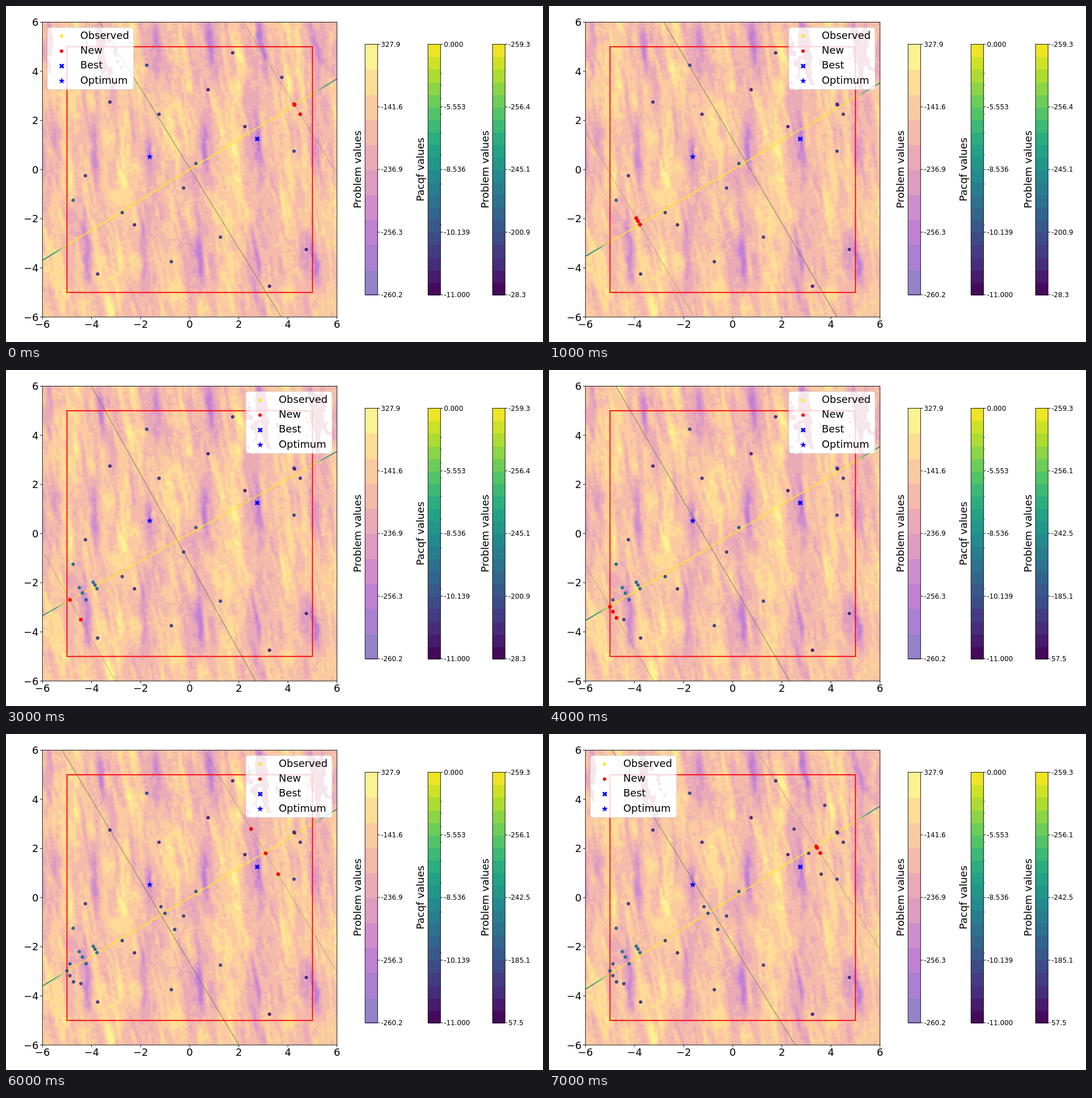
An HTML page with a canvas that plays this animation: 947 by 592 pixels, repeating every 8000 ms.

```html
<!DOCTYPE html>
<html lang="en">
<head>
<meta charset="utf-8">
<title>Optimisation steps</title>
<style>
html, body { margin: 0; width: 100%; height: 100%; overflow: hidden; background: #fff; }
canvas { display: block; }
</style>
</head>
<body>
<canvas id="stage" width="947" height="592"></canvas>
<script>
const ctx = document.getElementById('stage').getContext('2d');
const FONT = '"DejaVu Sans", sans-serif';
const LEFT = 64, TOP = 28, SIZE = 520, UNIT = 43.29;
const px = x => 324 + x * UNIT;
const py = y => 288.2 - y * UNIT;
const mix = (a, b, t) => a + (b - a) * t;
const clamp = (v, lo, hi) => Math.max(lo, Math.min(hi, v));
const bell = d => Math.exp(-d * d);

const palette = hex => hex.split(' ').map(h => [0, 2, 4].map(i => parseInt(h.substr(i, 2), 16)));
const WARM = palette('2c0594 5502a4 7e03a8 a01a9c bf3984 d6556d ea7457 f89540 feba2c f7e425')
  .map(c => c.map(v => (v + 255) / 2));
const VIRIDIS = palette('440154 482475 414487 355f8d 2a788e 21918c 22a884 44bf70 7ad151 bddf26 fde725');
const css = c => `rgb(${c.map(Math.round)})`;
const blend = (a, b, t) => a.map((v, i) => mix(v, b[i], t));
function viridis(t) {
  const i = Math.min(9, Math.floor(t * 10));
  return css(blend(VIRIDIS[i], VIRIDIS[i + 1], t * 10 - i));
}

function hash(x, y) {
  const s = Math.sin(x * 127.1 + y * 311.7) * 43758.5453;
  return (s - Math.floor(s)) * 2 - 1;
}
function noise(x, y) {
  const ix = Math.floor(x), iy = Math.floor(y);
  const ease = t => t * t * (3 - 2 * t);
  const fx = ease(x - ix), fy = ease(y - iy);
  return mix(mix(hash(ix, iy), hash(ix + 1, iy), fx), mix(hash(ix, iy + 1), hash(ix + 1, iy + 1), fx), fy);
}

// Valleys sit on a slightly skewed lattice; ridges run halfway between its columns.
function height(x, y) {
  const row = Math.round((y - 68) / 187), dy = y - 68 - row * 187;
  const spacing = 94 + 0.016 * (y - 70);
  const bend = 5 * Math.sin(dy / 187 * 2 * Math.PI) + 4 * noise(x / 45, y / 30);
  const track = (x + 2.5 * noise(x / 9, y / 12) - 75 + 0.09 * (y - 70) - bend) / spacing;
  const column = Math.round(track), d = (track - column) * spacing;
  const depth = (0.85 + 0.15 * hash(column, row)) * bell(dy / 58);
  const valley = depth * (2.9 * bell(d / 6) + 1.4 * bell(d / 17));
  const ridge = bell((spacing / 2 - Math.abs(d)) / 13);

  const u = x - 0.17 * y + 4 * noise(x / 30, y / 45);
  const grain = 1.3 * noise(u / 11, y / 75) + 0.95 * noise(u / 6 + 50, y / 28)
    + 0.6 * noise((x + y / 2) / 6 + 90, (y - x / 2) / 6);
  return 6.95 + grain - valley + ridge;
}
const HEIGHTS = Array.from({ length: SIZE * SIZE }, (_, i) =>
  height(i % SIZE + LEFT, Math.floor(i / SIZE) + TOP));

function paint(colorOf) {
  const layer = document.createElement('canvas');
  layer.width = layer.height = SIZE;
  const c = layer.getContext('2d'), image = c.createImageData(SIZE, SIZE);
  HEIGHTS.forEach((h, i) => image.data.set([...colorOf(h), 255], i * 4));
  c.putImageData(image, 0, 0);
  return layer;
}
const landscape = paint(h => {
  const v = clamp(h, 0.5, 9.4), low = Math.floor(v - 0.5);
  return blend(WARM[low], WARM[Math.min(9, low + 1)], clamp((v - 1 - low) * 5 + 0.5, 0, 1));
});
const twoTone = paint(h => h < 5.8 ? [210, 135, 160] : [255, 255, 255]);

// Latin hypercube start: the row taken in each half-unit column
const RANKS = [7, 9, 1, 15, 6, 5, 18, 14, 2, 8, 10, 16, 4, 19, 13, 12, 0, 17, 11, 3];
const SAMPLES = RANKS.map((rank, i) => [i / 2 - 4.75, rank / 2 - 4.75]);
const BEST = SAMPLES[15], OPTIMUM = [-1.63, .52];

// slope of the main line, centre of the crossing line, first new point, distances of the new points
const STEPS = [
  { slope: .616, mid: .03, from: [4.25, 2.66], spread: [0, .03, .41] },
  { slope: .588, mid: .72, from: [-3.93, -1.98], spread: [0, .12, .26] },
  { slope: .573, mid: .01, from: [-4.5, -2.2], spread: [0, .22, .49] },
  { slope: .557, mid: -.66, from: [-4.88, -2.7], spread: [0, .8] },
  { slope: .590, mid: -1.22, from: [-5, -2.98], spread: [0, .2, .45] },
  { slope: .600, mid: -1.42, from: [-1.17, -.37], spread: [0, .27, .93] },
  { slope: .600, mid: -1.6, from: [2.5, 2.79], spread: [0, .99, 1.84] },
  { slope: .621, mid: -1.18, from: [3.4, 2.08], spread: [0, .06, .27] }
];
const added = ({ slope, from: [x, y], spread }) => spread.map(s => [x + s * slope, y - s]);
const shade = ([x, y]) => .17 + .06 * hash(x, y)
  + .28 * bell(Math.hypot(x + 4.4, y + 2.1)) + .17 * bell(Math.hypot(x, y));

function line(x1, y1, x2, y2, color, width = 0.9) {
  ctx.strokeStyle = color;
  ctx.lineWidth = width;
  ctx.beginPath();
  ctx.moveTo(x1, y1);
  ctx.lineTo(x2, y2);
  ctx.stroke();
}
function frameRect(x, y, w, h, color = '#000', width = 0.9) {
  ctx.strokeStyle = color;
  ctx.lineWidth = width;
  ctx.strokeRect(x, y, w, h);
}
function text(s, x, y, size = 17.9, align = 'left') {
  ctx.font = `${size}px ${FONT}`;
  ctx.textAlign = align;
  ctx.fillStyle = '#000';
  ctx.fillText(s, x, y);
}
function dot(x, y, color, r = 3) {
  ctx.fillStyle = color;
  ctx.beginPath();
  ctx.arc(x, y, r, 0, Math.PI * 2);
  ctx.fill();
}
function star(x, y) {
  ctx.fillStyle = '#00f';
  ctx.beginPath();
  for (let i = 0; i < 10; i++) {
    const r = i % 2 ? 2.3 : 6, a = i * Math.PI / 5;
    ctx.lineTo(x + r * Math.sin(a), y - r * Math.cos(a));
  }
  ctx.fill();
}
function cross(x, y) {
  for (const s of [-3.3, 3.3]) line(x - 3.3, y - s, x + 3.3, y + s, '#00f', 3.1);
}
// Line through (x, y) across the whole plot, perpendicular to the main line
function crossing(x, y, slope, color, width) {
  line(px(x - 12 * slope), py(y + 12), px(x + 12 * slope), py(y - 12), color, width);
}

function legendPath(x) {
  ctx.beginPath();
  ctx.roundRect(x, 38, 152, 109, 4);
}
function drawLegend(x) {
  legendPath(x);
  ctx.fillStyle = 'rgba(255,255,255,.8)';
  ctx.fill();
  ctx.strokeStyle = 'rgba(204,204,204,.8)';
  ctx.lineWidth = 1;
  ctx.stroke();
  dot(x + 25, 53.2, '#fde725');
  dot(x + 25, 79.4, '#f00');
  cross(x + 25.3, 105.8);
  star(x + 25.3, 132);
  ['Observed', 'New', 'Best', 'Optimum'].forEach((s, i) => text(s, x + 58, 58 + i * 26.2));
}

function drawBar(x, colors, labels, title) {
  const top = 67.4, h = 441.4, step = h / colors.length;
  colors.forEach((color, i) => {
    ctx.fillStyle = color;
    ctx.fillRect(x, Math.round(top + h - (i + 1) * step), 22, Math.ceil(step));
  });
  frameRect(x, top, 22.1, h);
  labels.forEach((s, i) => {
    const y = top + i * h / 4;
    line(x + 22.1, y, x + 26.3, y, '#000');
    text(s, x + 28, y + 4.3, 11.9);
  });
  ctx.save();
  ctx.translate(x - 7.2, 288);
  ctx.rotate(-Math.PI / 2);
  text(title, 0, 0, 17.9, 'center');
  ctx.restore();
}

const warmBands = WARM.map(css);
const coolBands = Array.from({ length: 20 }, (_, i) => viridis((i + .5) / 20));

function drawBars(index) {
  drawBar(633.2, warmBands, ['327.9', '-141.6', '-236.9', '-256.3', '-260.2'], 'Problem values');
  drawBar(744.2, coolBands, ['0.000', '-5.553', '-8.536', '-10.139', '-11.000'], 'Pacqf values');
  for (let w = 2; w < 10; w++) {
    const y = 67.4 + 441.4 * (1 - Math.log(w) / Math.log(12));
    line(766.3, y, 768.7, y, '#000', 0.7);
  }
  const middle = index < 4 ? ['-256.4', '-245.1', '-200.9', '-28.3'] : ['-256.1', '-242.5', '-185.1', '57.5'];
  drawBar(858, coolBands, ['-259.3', ...middle], 'Problem values');
}

function drawAxes() {
  frameRect(px(-6), py(6), 12 * UNIT, 12 * UNIT);
  for (let v = -6; v <= 6; v += 2) {
    const label = String(v).replace('-', '\u2212');
    line(px(v), 548, px(v), 552, '#000');
    line(60, py(v), 64, py(v), '#000');
    text(label, px(v), 567.3, 17.9, 'center');
    text(label, 57.3, py(v) + 6.6, 17.9, 'right');
  }
}

function drawPlot(index) {
  const { slope, mid, from } = STEPS[index];
  const legendX = slope > .61 ? 73 : 423;
  ctx.save();
  ctx.beginPath();
  ctx.rect(px(-6), py(6), 12 * UNIT, 12 * UNIT);
  ctx.clip();
  ctx.drawImage(landscape, LEFT, TOP);
  ctx.save();
  legendPath(legendX);
  ctx.clip();
  ctx.drawImage(twoTone, LEFT, TOP);
  ctx.restore();

  crossing(...from, slope, 'rgba(120,130,100,.45)', 1.1);
  crossing(mid, 0, slope, 'rgba(85,120,75,.68)', 1.2);
  const glow = ctx.createLinearGradient(px(-6), 0, px(6), 0);
  [[0, .4], [.045, .55], [.065, .82], [.085, 1]].forEach(([at, t]) => {
    glow.addColorStop(at, viridis(t));
    glow.addColorStop(1 - at, viridis(t));
  });
  line(px(-6), py(-6 * slope), px(6), py(6 * slope), glow, 1.7);
  frameRect(px(-5), py(5), 10 * UNIT, 10 * UNIT, '#f00', 1.8);

  const observed = SAMPLES.concat(...STEPS.slice(0, index).map(added));
  for (const p of observed) if (p !== BEST) dot(px(p[0]), py(p[1]), viridis(shade(p)));
  for (const [x, y] of added(STEPS[index])) dot(px(x), py(y), '#f00', 3.3);
  cross(px(BEST[0]), py(BEST[1]));
  star(px(OPTIMUM[0]), py(OPTIMUM[1]));
  drawLegend(legendX);
  ctx.restore();
}

const start = performance.now();
let shown = -1;
function frame() {
  const index = Math.floor((performance.now() - start) / 1000) % STEPS.length;
  if (index !== shown) {
    shown = index;
    ctx.fillStyle = '#fff';
    ctx.fillRect(0, 0, 947, 592);
    drawPlot(index);
    drawAxes();
    drawBars(index);
  }
  requestAnimationFrame(frame);
}
frame();
</script>
</body>
</html>
```
